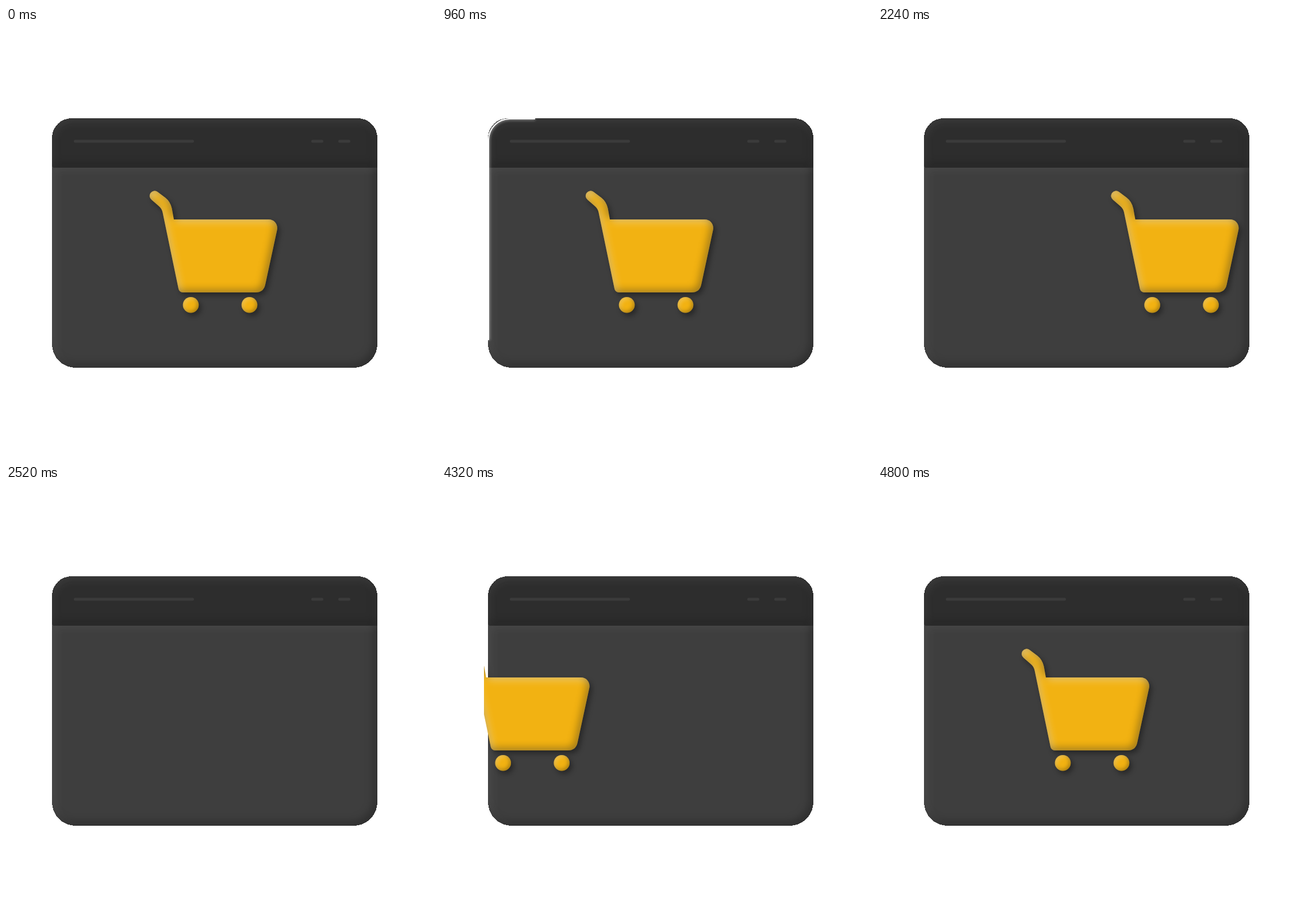
Recreate the animation shown at these times as an HTML page. Size 748 by 748 pixels, loop 5.76 s.

```html
<!DOCTYPE html>
<html lang="en">
<head>
<meta charset="utf-8">
<title>Shopping cart window</title>
<style>
  html, body { margin: 0; width: 100%; height: 100%; overflow: hidden; background: #fff; }
  svg { display: block; width: 100vw; height: 100vh; }
  .crisp { shape-rendering: crispEdges; }
  .bars { stroke: #3b3b3b; stroke-width: 5; stroke-linecap: round; }
  .edge { fill: none; stroke: #fff; }
</style>
</head>
<body>
<svg viewBox="0 0 748 748">
  <defs id="defs">
    <clipPath id="windowClip">
      <path d="M80 191A34 34 0 0 1 114 157H612A34 34 0 0 1 646 191V550A41 41 0 0 1 605 591H121A41 41 0 0 1 80 550Z"/>
    </clipPath>
    <clipPath id="stageClip"><rect x="73" y="157" width="578" height="434"/></clipPath>
    <filter id="soft" x="-20%" y="-20%" width="140%" height="140%"><feGaussianBlur stdDeviation="5"/></filter>
    <filter id="glow"><feGaussianBlur stdDeviation="2"/></filter>
    <path id="basket" d="M263.6 285L277 295Q286 302 288.6 314L292 333H457C467 333 473.5 342 471.5 351.5L451 446.5Q448 460 434 460H308Q301.5 460 300 453.5L272.5 321Q271 314 265.5 309.5L253.4 299A8.6 8.6 0 0 1 263.6 285Z"/>
    <g id="wheels">
      <circle cx="321.5" cy="481.8" r="13.8"/>
      <circle cx="423.5" cy="481.8" r="13.8"/>
    </g>
    <path id="rim" pathLength="1" d="M612 158H118A37 37 0 0 0 81 195V543"/>
  </defs>

  <path class="crisp" fill="#3e3e3e" filter="url(#bodyBevel)"
        d="M80 239H646V550A41 41 0 0 1 605 591H121A41 41 0 0 1 80 550Z"/>
  <path class="crisp" fill="#2d2d2d" filter="url(#headerBevel)"
        d="M80 191A34 34 0 0 1 114 157H612A34 34 0 0 1 646 191V243H84Q80 243 80 239Z"/>
  <path class="bars" d="M120.5 197H324.5M533.5 197H549.5M580.5 197H596.5"/>

  <g clip-path="url(#windowClip)">
    <use href="#rim" class="edge trim" stroke-width="5" opacity=".4" filter="url(#glow)"/>
    <use href="#rim" class="edge trim" stroke-width="2"/>
    <g class="cart">
      <g transform="translate(4 5)" opacity=".38" filter="url(#soft)">
        <use href="#basket"/><use href="#wheels"/>
      </g>
    </g>
  </g>
  <g clip-path="url(#stageClip)">
    <g class="cart" fill="#f2b212">
      <use href="#basket" filter="url(#basketBevel)"/>
      <use href="#wheels" filter="url(#wheelBevel)"/>
    </g>
  </g>
</svg>
<script>
const LOOP = 5760, FRAME = 40, MOVE = 960;
const EXIT_AT = 1920, ENTER_AT = 3840, RIM_END = 1800;

// Light inner rim from one side, dark inner rim from the opposite one.
function addBevel(id, blur, dx, dy, light, dark) {
  const inset = (sign, color, opacity, name) => `
    <feOffset in="blur" dx="${sign * dx}" dy="${sign * dy}"/>
    <feComposite in="SourceAlpha" operator="out" result="rim"/>
    <feFlood flood-color="${color}" flood-opacity="${opacity}"/>
    <feComposite in2="rim" operator="in" result="${name}"/>`;
  document.getElementById('defs').insertAdjacentHTML('beforeend', `
    <filter id="${id}" color-interpolation-filters="sRGB">
      <feGaussianBlur in="SourceAlpha" stdDeviation="${blur}" result="blur"/>
      ${inset(1, '#fff', light, 'light')}${inset(-1, '#000', dark, 'dark')}
      <feMerge><feMergeNode in="SourceGraphic"/><feMergeNode in="light"/><feMergeNode in="dark"/></feMerge>
    </filter>`);
}
addBevel('bodyBevel', 8, 5, 5, 0.09, 0.3);
addBevel('headerBevel', 8, 2, 5, 0.09, 0.24);
addBevel('basketBevel', 7, 4, 4, 0.42, 0.34);
addBevel('wheelBevel', 3.5, 2.5, 2.5, 0.28, 0.32);

const clamp = x => Math.min(1, Math.max(0, x));
const smooth = x => { x = clamp(x); return x * x * (3 - 2 * x); };

// cubic-bezier(0, 0, .667, 1)
function arrive(p) {
  const q = 1 - clamp(p);
  let u = q;
  for (let i = 0; i < 8; i++) u = q / (1 + u - u * u);
  return 1 - smooth(u);
}

function cartX(t) {
  if (t < ENTER_AT) return 600 * smooth((t - EXIT_AT) / MOVE);
  return -604 * (1 - arrive((t - ENTER_AT) / MOVE));
}

const carts = document.querySelectorAll('.cart');
const trims = document.querySelectorAll('.trim');

function draw(t) {
  const x = cartX(t);
  carts.forEach(c => c.setAttribute('transform', `translate(${x} 0)`));

  const head = smooth(t / MOVE), tail = smooth(t / (2 * MOVE));
  const visible = t > 0 && t < RIM_END;
  trims.forEach(el => {
    el.style.visibility = visible ? 'visible' : 'hidden';
    el.style.strokeDasharray = `${head - tail} 2`;
    el.style.strokeDashoffset = -tail;
  });
}

const start = performance.now();
function tick() {
  const step = Math.floor((performance.now() - start + 2) / FRAME);
  draw(step * FRAME % LOOP);
  requestAnimationFrame(tick);
}
tick();
</script>
</body>
</html>
```
